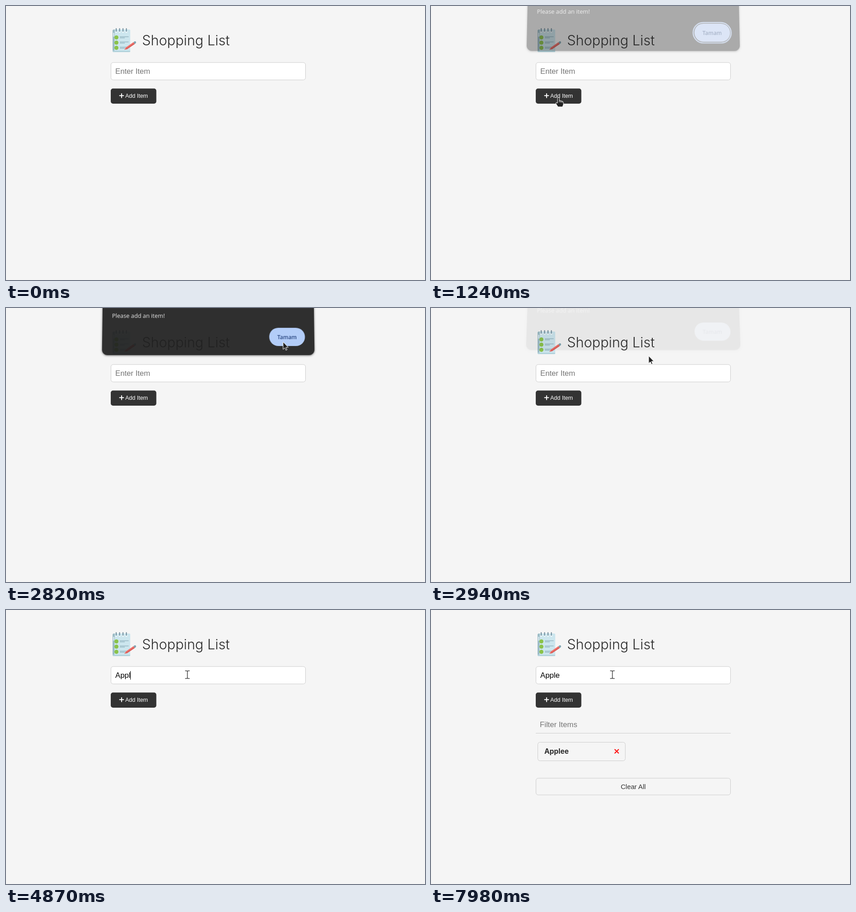
Animation of 924 by 606 pixels, one loop 8 s. Source, as an HTML page:

```html
<!DOCTYPE html>
<html lang="en">
<head>
<meta charset="utf-8">
<title>Shopping List</title>
<style>
  html, body { margin: 0; width: 100%; height: 100%; overflow: hidden; background: #f5f5f5; }
  body { position: relative; }
  svg { position: absolute; left: 0; top: 0; width: 924px; height: 606px; }
  text { white-space: pre; }

  .title { font: 300 30.5px Inter, sans-serif; fill: #2b2b2b; }
  .field { font: 16.7px "Liberation Sans", Arial, sans-serif; fill: #757575; }
  .add { font: 12.5px "Liberation Sans", Arial, sans-serif; fill: #fff; }
  .item { font: 700 15.5px Inter, sans-serif; fill: #2b2b2b; }
  .clear { font: 14.8px "Liberation Sans", Arial, sans-serif; fill: #333; }
  .box { fill: none; stroke: #ccc; }
  #typed { fill: #000; }

  .message { font: 12.8px "Open Sans", "Noto Sans", sans-serif; fill: #e8e8e8; }
  .ok { font: 600 12px "Open Sans", "Noto Sans", sans-serif; fill: #1b3a78; }
  .panel { fill: #1f1f1f; filter: drop-shadow(0 1px 2px rgba(0, 0, 0, .55)); }

  #dialog { transform-origin: 446px 10px; animation: dialog 8s linear infinite; }
  @keyframes dialog {
    0%, 14.75% { opacity: 0; transform: translateY(-20px) perspective(1000px) rotateX(9deg); }
    15.5%, 16.74% { opacity: .35; transform: translateY(-12px) perspective(1000px) rotateX(5.5deg); }
    16.75% { opacity: .95; transform: translateY(-1px) perspective(1000px) rotateX(.5deg); }
    17.5%, 34.75% { opacity: 1; transform: translateY(0) perspective(1000px) rotateX(0deg); }
    35.25%, 35.49% { opacity: .93; transform: translateY(-7.2px) perspective(1000px) rotateX(3.4deg); }
    36.75%, 36.99% { opacity: .065; transform: translateY(-18.7px) perspective(1000px) rotateX(8.5deg); }
    37%, 100% { opacity: 0; transform: translateY(-20px) perspective(1000px) rotateX(9deg); }
  }

  #pointer { animation: pointer 8s linear infinite; }
  @keyframes pointer {
    0%, .5% { transform: translate(835px, 583px); animation-timing-function: cubic-bezier(.3, .4, .3, 1); }
    8.625%, 17.5% { transform: translate(281px, 202px); animation-timing-function: cubic-bezier(.4, 0, .7, .9); }
    21.75% { transform: translate(484px, 113px); animation-timing-function: cubic-bezier(.3, .4, .4, 1); }
    26.125%, 26.374% { transform: translate(605px, 69px); animation-timing-function: ease-out; }
    29.25%, 35.49% { transform: translate(611px, 75px); }
    36.75%, 36.99% { transform: translate(480px, 106px); animation-timing-function: cubic-bezier(.2, .6, .4, 1); }
    41.5%, 42% { transform: translate(402px, 131px); animation-timing-function: ease-out; }
    46.75%, 100% { transform: translate(400px, 143px); }
  }
</style>
</head>
<body>
<svg viewBox="0 0 924 606">
  <g id="notepad">
    <rect x="235" y="52" width="12" height="50" rx="3" fill="#9dbcc6"/>
    <path d="M240 52H272Q274 52 274 54V100Q274 102 272 102H239Z" fill="#cce6ee"/>
    <path d="M235 98Q235 102 239 102H272Q274 102 274 100V99H239Z" fill="#b3d3dc"/>
    <path d="M237.500 60V67" stroke="#e9f6fa" stroke-width="2" stroke-linecap="round"/>
    <g fill="#edf7fa">
      <circle cx="243" cy="57" r="2.400"/><circle cx="250.500" cy="57" r="2.400"/>
      <circle cx="258" cy="57" r="2.400"/><circle cx="265.500" cy="57" r="2.400"/>
    </g>
    <path d="M243 50V56M250.500 50V56M258 50V56M265.500 50V56" stroke="#607f90" stroke-width="1.800" stroke-linecap="round"/>
    <g fill="#8bc34a">
      <circle cx="243.500" cy="69.500" r="4.500"/>
      <circle cx="243.500" cy="81" r="4.500"/>
      <circle cx="243.500" cy="92.500" r="4.500"/>
    </g>
    <path d="M251 68H270.500M251 70.500H262M251 79.500H270.500M251 82H262M251 91H268M251 93.500H262" stroke="#96b8c4" stroke-width="1.500"/>
    <path d="M261 96.500L264.500 91.500L281 80L284 84L267 95.500Z" fill="#f0716a"/>
    <path d="M261 96.500L267 95.500L284 84L282.800 82.300Z" fill="#d95f5a"/>
    <path d="M281 80L283.500 78.200Q285.500 77.300 286.500 79Q287.500 81 286 82.500L284 84Z" fill="#7fa3b0"/>
  </g>
  <text class="title" x="300" y="87">Shopping List</text>

  <rect class="box" x="231.500" y="125" width="429" height="38.500" rx="5" style="fill:#fff"/>
  <text id="hint" class="field" x="241" y="150">Enter Item</text>
  <text id="typed" class="field" x="241" y="150"></text>
  <rect id="caret" x="241" y="135" width="1" height="19"/>

  <rect x="231" y="182.500" width="100.500" height="33.500" rx="5" fill="#333"/>
  <path d="M250.500 198.300H259.300M254.900 193.900V202.700" stroke="#fff" stroke-width="2" stroke-linecap="round"/>
  <text class="add" x="263" y="203">Add Item</text>

  <g id="list">
    <text class="field" x="240" y="259">Filter Items</text>
    <path class="box" d="M231 272.500H661"/>
    <rect class="box" x="235.500" y="292.500" width="193" height="41" rx="5"/>
    <text class="item" x="250" y="318">Applee</text>
    <path d="M405.500 308.500L413.500 316.500M413.500 308.500L405.500 316.500" stroke="#f00" stroke-width="2" stroke-linecap="round"/>
    <rect class="box" x="231.500" y="372" width="429" height="37" rx="5"/>
    <text class="clear" x="446" y="396" text-anchor="middle">Clear All</text>
  </g>
</svg>

<svg id="dialog" viewBox="0 0 924 606">
  <rect class="panel" x="213" y="-80" width="466" height="191" rx="12"/>
  <path d="M486.500 -2Q485.500 3 481.500 2.200" fill="none" stroke="#e8e8e8" stroke-width="1.700"/>
  <text class="message" x="234" y="29">Please add an item!</text>
  <rect id="ring" x="577.300" y="48.700" width="83.400" height="44.800" rx="22.400" fill="none" stroke="#a8c7fa" stroke-width="2.200"/>
  <rect x="580" y="51" width="78.500" height="40" rx="20" fill="#adc9f8"/>
  <text class="ok" x="619" y="76" text-anchor="middle">Tamam</text>
</svg>

<svg viewBox="0 0 924 606">
  <g id="pointer">
    <path id="arrow" d="M0 0V16.500L3.800 13L6.300 18.500L8.800 17.400L6.400 12H11.500Z" fill="#222" stroke="#fff"/>
    <g id="hand">
      <path d="M-2 2Q-2 0 0 0Q2 0 2 2V7L9 8.800Q11 9.500 11 12V16L9 21H-1L-5.500 14Q-6 11.300 -4 11.300L-2 13Z" fill="#222" stroke="#fff"/>
      <path d="M2 7V11M5 8V11.500M8 9V12" stroke="#fff"/>
    </g>
    <g id="ibeam" fill="none" stroke-linecap="round">
      <path id="beam" d="M-4.500 -8.500H-2Q0 -8.500 0 -7V7Q0 8.500 -2 8.500H-4.500M4.500 -8.500H2Q0 -8.500 0 -7M0 7Q0 8.500 2 8.500H4.500" stroke="#fff" stroke-width="3"/>
      <use href="#beam" style="stroke:#333"/>
      <path d="M-4.500 -8.500H-2Q0 -8.500 0 -7V7Q0 8.500 -2 8.500H-4.500M4.500 -8.500H2Q0 -8.500 0 -7M0 7Q0 8.500 2 8.500H4.500" stroke="#444" stroke-width="1.500"/>
    </g>
  </g>
</svg>

<script>
  const LOOP = 8000;
  const RING_OFF = 2540;
  const LIST_ON = 5970;
  const $ = id => document.getElementById(id);

  // [time, letters typed, caret visible]
  const typing = [
    [0, 0, 0], [3620, 0, 1], [4150, 0, 0],
    [4300, 1, 1], [4480, 2, 1], [4630, 3, 1], [4790, 4, 1], [4870, 5, 1],
    [5440, 5, 0], [5520, 6, 1], [LIST_ON, 0, 1], [6550, 0, 0],
    [6840, 1, 1], [7000, 2, 1], [7130, 3, 1], [7310, 4, 1], [7430, 5, 1],
    [7960, 5, 0], [7980, 6, 1]
  ];
  const pointers = [[0, ''], [40, 'arrow'], [540, 'hand'], [1400, 'arrow'], [3200, 'ibeam']];

  const at = (steps, t) => steps.findLast(step => step[0] <= t);
  const show = (id, on) => { $(id).style.display = on ? '' : 'none'; };

  // Share the clock of the CSS animations so that both stay in step.
  const clock = $('pointer').getAnimations()[0];

  function draw() {
    const now = clock ? clock.currentTime : performance.now();
    const t = (now || 0) % LOOP;
    const [, count, caretOn] = at(typing, t);
    const [, shape] = at(pointers, t);

    $('typed').textContent = 'Applee'.slice(0, count);
    const width = count ? $('typed').getComputedTextLength() : 0;
    $('caret').setAttribute('x', Math.round(241 + width));
    show('caret', caretOn);
    show('hint', !count);
    show('list', t >= LIST_ON);
    show('ring', t < RING_OFF);
    for (const id of ['arrow', 'hand', 'ibeam']) show(id, id === shape);
    requestAnimationFrame(draw);
  }
  draw();
</script>
</body>
</html>
```
